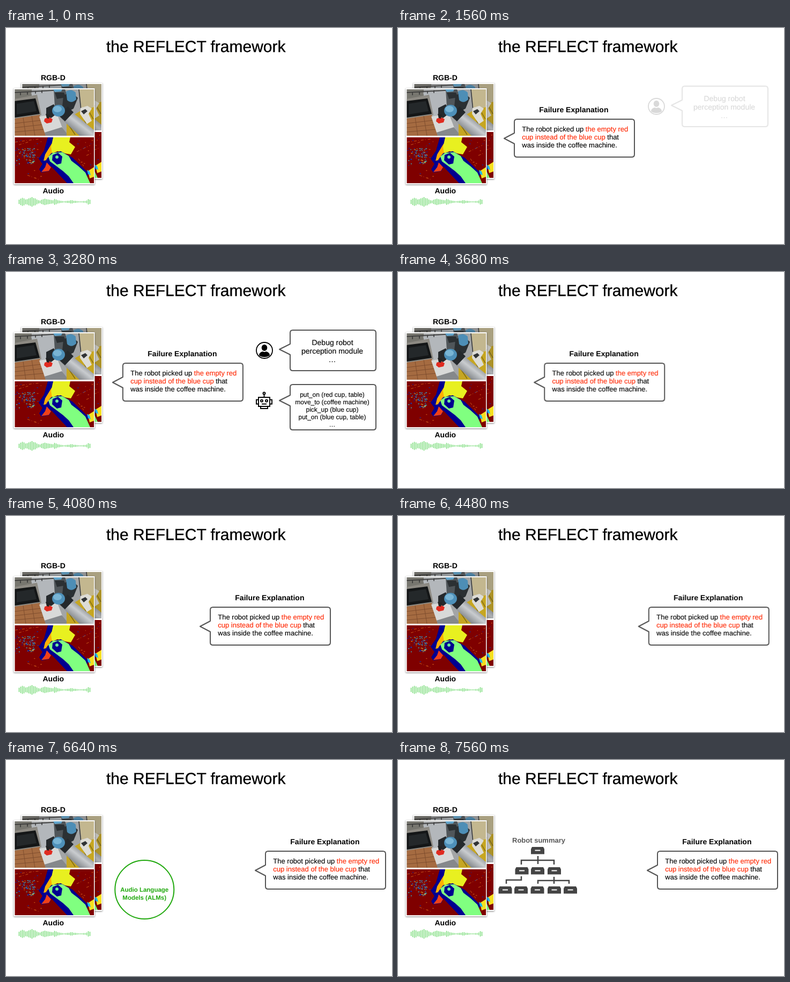
Animation of 720 by 405 pixels, one loop 8 s. Source, as an HTML page:

```html
<!DOCTYPE html>
<html lang="en">
<head>
<meta charset="utf-8">
<title>Framework overview</title>
<style>
html, body { margin: 0; width: 100%; height: 100%; overflow: hidden; background: #fff; }
svg { display: block; width: 100vw; height: 100vh; font-family: "Liberation Sans", Arial, sans-serif; }
text { text-rendering: geometricPrecision; }
.title { font-size: 30px; stroke: #000; stroke-width: .35; }
.plain { stroke: #000; stroke-width: .12; }
.plain tspan { fill: #ff2600; stroke: #ff2600; }
.bold { font-weight: bold; font-size: 14px; }
.mid { text-anchor: middle; }
.bubble { fill: #fff; stroke: #555; stroke-width: 2; stroke-linejoin: round; }
.card { fill: #fff; filter: drop-shadow(.5px 1.5px 1.5px rgba(0, 0, 0, .5)); }
.model { text-anchor: middle; font-weight: bold; font-size: 11.5px; }
.model circle { fill: none; stroke: currentColor; stroke-width: 2; }
.model text { fill: currentColor; }
.step { opacity: 0; }
</style>
</head>
<body>
<svg viewBox="0 0 720 405" xmlns="http://www.w3.org/2000/svg">
<defs>
  <clipPath id="photoClip"><rect x="16.500" y="115" width="147.500" height="87"/></clipPath>
  <clipPath id="depthClip"><rect x="16.500" y="205" width="147.500" height="86"/></clipPath>
  <linearGradient id="steel" x1="0" y1="1" x2="1" y2="0">
    <stop offset=".2" stop-color="#6c7074"/><stop offset=".5" stop-color="#c9cccf"/><stop offset=".8" stop-color="#5e6367"/>
  </linearGradient>

  <g id="photo" clip-path="url(#photoClip)">
    <path fill="#a3a5a6" d="M16 115h149v87H16z"/>
    <path fill="#77766f" d="M16 115h32v15l-32 7z"/>
    <path fill="#b3b7bb" d="M47 121l42-4 10 60-38 12z"/>
    <path fill="#c3b78f" d="M137 115h28v38h-24z"/>
    <path stroke="#333" stroke-width="1.500" fill="none" d="M16 121l74-4M27 120v6M40 119v6M55 118v5M67 117v5M136 115l4 40"/>
    <path fill="#8d8a83" d="M16 133l42-8 8 38-50 10z"/>
    <path fill="#141617" d="M16 137l39-5 8 29-47 7z"/>
    <path fill="#24282a" d="M20 142l32-5 5 19-37 6z"/>
    <path fill="#a56b41" d="M16 170l47-7 11 39H16z"/>
    <path stroke="#77472a" stroke-width=".8" fill="none" d="M16 179l50-6M16 187l53-6M16 195l55-5M32 168l5 34M48 165l6 37"/>
    <path fill="#d8d9d8" d="M62 166l33-5 10 26-33 9z"/>
    <path fill="#85888b" d="M72 196l32-10 13 16H74z"/>
    <path fill="#c6a622" d="M113 171l25-15 27-8v54h-52z"/>
    <path stroke="#7e6917" stroke-width="1.500" fill="none" d="M117 182l12 18M124 172l11 14M143 163l8 22M155 157l8 14"/>
    <path fill="#dddcd6" d="M139 150l13-4 8 5-6 10 6 13-9 6-13-19z"/>
    <path fill="#303335" d="M140 156l8-4 4 4-7 6z"/>
    <path fill="#50565a" d="M89 115h21l9 25-20 13-8-6z"/>
    <path fill="#2b3033" d="M91 121h17l4 9-17 3zM107 127l14-8 13 12-8 20-14 8-7-12z"/>
    <path fill="#4d8eb6" d="M112 119q10-6 18 2l1 13q-9 9-17 1z"/>
    <path fill="#62a5cb" d="M88 115h17l-2 4-12 1z"/>
    <path fill="#25292c" d="M75 150l14-7 9 15-14 11-9-5z"/>
    <path fill="url(#steel)" d="M103 170l16-16 46 38v10h-28z"/>
    <path fill="#25292c" d="M99 165l16-18 11 11-16 17z"/>
    <ellipse cx="98" cy="155" rx="12" ry="11" fill="#4e90b9"/>
    <ellipse cx="96" cy="152" rx="8" ry="6" fill="#79b5d5"/>
    <path fill="#e02b20" d="M72 170l8-3 7 4-2 6-9 2-5-4z"/>
    <path fill="#222" d="M74 161l8 2-2 7-4-1z"/>
  </g>

  <g id="depth" clip-path="url(#depthClip)">
    <path fill="#7f0000" d="M16 204h149v88H16z"/>
    <path fill="#000090" d="M78 205h12v13l-10 15-2 14 8 8-5 13-15 3-4-6 6-10-7-10 10-15z"/>
    <path fill="#ffb000" d="M85 217l7 4-7 14-6 12-9 2 3-12z"/>
    <path fill="#f04018" d="M76 252l8 9-4 7-14 2 7-9z"/>
    <path fill="#e8f020" d="M88 205h32l-2 9 11 9-8 14-12-2-13-4-10 5-2-13z"/>
    <path fill="#000090" d="M84 235l18-4 22 12 30 29-9 19h-31l-30-32-9-12z"/>
    <path fill="#80ff80" d="M88 234l17-1 12 7 5 9 13 10 13 12 9 20h-31l-9-13-11-10-12-9-12-9-3-9z"/>
    <path fill="#000090" d="M87 238l10-4 8 7-2 13-8 2-9-8z"/>
    <circle cx="95" cy="242" r="3" fill="#68e898"/>
    <path fill="#f5e020" d="M153 268l11-7v18l-8 3z"/>
    <path fill="#20b8f0" d="M151 266l5 3 2 7-5-2z"/>
    <path fill="none" stroke="#d86a20" stroke-width=".8" stroke-dasharray="5 3 1 4" d="M17 214l44-6M24 219l20-6M132 232l25-12M135 245l10 14M150 239l9-4M40 276l24 9"/>
    <g id="specks"></g>
  </g>

  <g id="drawer">
    <path fill="#444" d="M2 0h21l2 4v9.500H0V4z"/>
    <path stroke="#fff" stroke-width="2" d="M7.500 6.500h10"/>
  </g>
</defs>

<rect width="720" height="405" fill="#fff"/>
<text class="title" x="187" y="44.700">the REFLECT framework</text>
<text class="bold" x="65" y="98">RGB-D</text>
<g transform="translate(14 -10)">
  <path class="card" d="M14.500 113h151v180h-151z"/>
  <use href="#photo"/><use href="#depth"/>
  <path fill="#444" opacity=".2" d="M16.500 115h147.500v87H16.500z"/>
</g>
<path class="card" d="M14.500 113h151v180h-151z"/>
<use href="#photo"/><use href="#depth"/>
<text class="bold" x="68.500" y="309.500">Audio</text>
<path id="wave" stroke="#78dc78" stroke-width="1.500"/>

<g id="failure" class="step"><g id="slide">
  <text class="bold" x="263.300" y="157.500">Failure Explanation</text>
  <path class="bubble" data-box="217 171 224 71 198 207 10"/>
  <g class="plain" font-size="13">
    <text x="231.300" y="194.300">The robot picked up <tspan>the empty red</tspan></text>
    <text x="231.300" y="209.300"><tspan>cup instead of the blue cup</tspan> that</text>
    <text x="231.300" y="224.300">was inside the coffee machine.</text>
  </g>
</g></g>

<g id="person" class="step">
  <circle cx="482" cy="147" r="15" fill="#fff" stroke="#000" stroke-width="1.800"/>
  <ellipse cx="482" cy="142" rx="5.300" ry="6"/>
  <path d="M472 156.500q0-6 7-7.500 3 2 6 0 7 1.500 7 7.500-4 3-10 3t-10-3z"/>
  <path class="bubble" data-box="530 109 160 76 510 145 10"/>
  <g class="mid plain" font-size="14">
    <text x="609" y="137">Debug robot</text>
    <text x="608.500" y="153">perception module</text>
    <text x="608.500" y="168.500">…</text>
  </g>
</g>

<g id="robot" class="step">
  <g fill="none" stroke="#000" stroke-width="1.900">
    <circle cx="481.500" cy="227.500" r="2"/>
    <path d="M481.500 229.500v5M471 235h21v17h-21zM471 239.500h-4v8h4M492 239.500h4v8h-4M475 252v4h13v-4M477 247.500h9"/>
    <circle cx="477" cy="241.500" r="2"/><circle cx="486" cy="241.500" r="2"/>
  </g>
  <path class="bubble" data-box="530 211 160 85 510 241 10"/>
  <g class="mid plain" font-size="12">
    <text x="608.500" y="234">put_on (red cup, table)</text>
    <text x="608.500" y="248">move_to (coffee machine)</text>
    <text x="608.500" y="262">pick_up (blue cup)</text>
    <text x="608.500" y="276">put_on (blue cup, table)</text>
    <text x="608.500" y="290">…</text>
  </g>
</g>

<g id="vision" class="step model" color="#f27a1a">
  <circle cx="257.500" cy="155.500" r="55"/>
  <text x="258.500" y="157">Visual Language</text>
  <text x="258.500" y="171.500">Models (VLMs)</text>
</g>
<g id="audio" class="step model" color="#1fa80c">
  <circle cx="258.300" cy="243" r="55"/>
  <text x="258.200" y="247">Audio Language</text>
  <text x="258.200" y="262">Models (ALMs)</text>
</g>

<g id="summary" class="step">
  <text x="213" y="154.500" font-size="13" font-weight="bold" fill="#595959">Robot summary</text>
  <path fill="none" stroke="#444" stroke-width="2.500" d="M261 180v15M230 196v-8h61v8M230 218v7h-28v7M291 219v13M261 232v-6h58v6"/>
  <g id="drawers"></g>
</g>
</svg>

<script>
const LOOP = 8000;
const get = id => document.getElementById(id);

// Rounded box with a tail pointing left.
for (const el of document.querySelectorAll("[data-box]")) {
  const [x, y, w, h, tipX, tipY, half] = el.dataset.box.split(" ").map(Number);
  const r = 5, iw = w - 2 * r, ih = h - 2 * r;
  el.setAttribute("d", `M${x + r} ${y}h${iw}q${r} 0 ${r} ${r}v${ih}q0 ${r} ${-r} ${r}h${-iw}` +
    `q${-r} 0 ${-r} ${-r}V${tipY + half}L${tipX} ${tipY}L${x} ${tipY - half}V${y + r}q0 ${-r} ${r} ${-r}z`);
}

const bars = [8, 12, 15, 13, 9, 10, 13, 15, 18, 14, 13, 9, 6, 5, 8, 10, 12, 10, 9, 8, 7, 6, 11, 9, 6,
  5, 4, 3, 2, 3, 4, 4, 6, 6, 4, 4, 3, 2, 2, 2, 3, 3, 5, 10, 8];
get("wave").setAttribute("d", bars.map((h, i) => `M${24.5 + 3 * i} ${326 - h / 2}v${h}`).join(""));

let seed = 7;
const random = () => (seed = seed * 16807 % 2147483647) / 2147483647;
const specks = (count, x, y, w, h, colors) => Array.from({ length: count }, () =>
  `<rect x="${x + w * random()}" y="${y + h * random()}" width="${1 + 2 * random()}" height="1.2" ` +
  `fill="${colors[Math.floor(random() * colors.length)]}"/>`).join("");
get("specks").innerHTML =
  specks(85, 17, 225, 36, 30, ["#0020b0", "#2878e0", "#30c8d8", "#d8a030"]) +
  specks(16, 17, 208, 50, 80, ["#c85018", "#1030a0"]) +
  specks(12, 132, 208, 32, 50, ["#c85018", "#1030a0"]);

const rows = [[163, 248], [201, 218.5, 248, 279], [237, 187.5, 217, 247.5, 279, 309]];
get("drawers").innerHTML = rows.map(([y, ...xs]) =>
  xs.map(x => `<use href="#drawer" x="${x}" y="${y}"/>`).join("")).join("");

// Each row: element, fade-in start and end, fade-out start and end (ms).
const fades = [
  ["failure", 555, 960, LOOP, LOOP],
  ["person", 1505, 1890, 3280, 3680],
  ["robot", 2355, 2780, 3280, 3680],
  ["vision", 5270, 5690, 6630, 6630],
  ["audio", 5720, 6150, 6670, 6670],
  ["summary", 6800, 7560, LOOP, LOOP]
];
const play = (id, frames) => {
  get(id).animate(frames.map(({ at, ...f }) => ({ offset: at / LOOP, ...f })),
    { duration: LOOP, iterations: Infinity }).startTime = 0;
};
for (const [id, inStart, inEnd, outStart, outEnd] of fades) {
  const frames = [
    { at: 0, opacity: 0 }, { at: inStart, opacity: 0 },
    { at: inEnd, opacity: 1 }, { at: outStart, opacity: 1 }
  ];
  if (outStart < LOOP) frames.push({ at: outEnd, opacity: 0 }, { at: LOOP, opacity: 0 });
  play(id, frames);
}
play("slide", [
  { at: 0, transform: "translateX(0px)" },
  { at: 3225, transform: "translateX(0px)", easing: "cubic-bezier(.37, 0, .63, 1)" },
  { at: 4720, transform: "translateX(267px)" },
  { at: LOOP, transform: "translateX(267px)" }
]);
</script>
</body>
</html>
```
